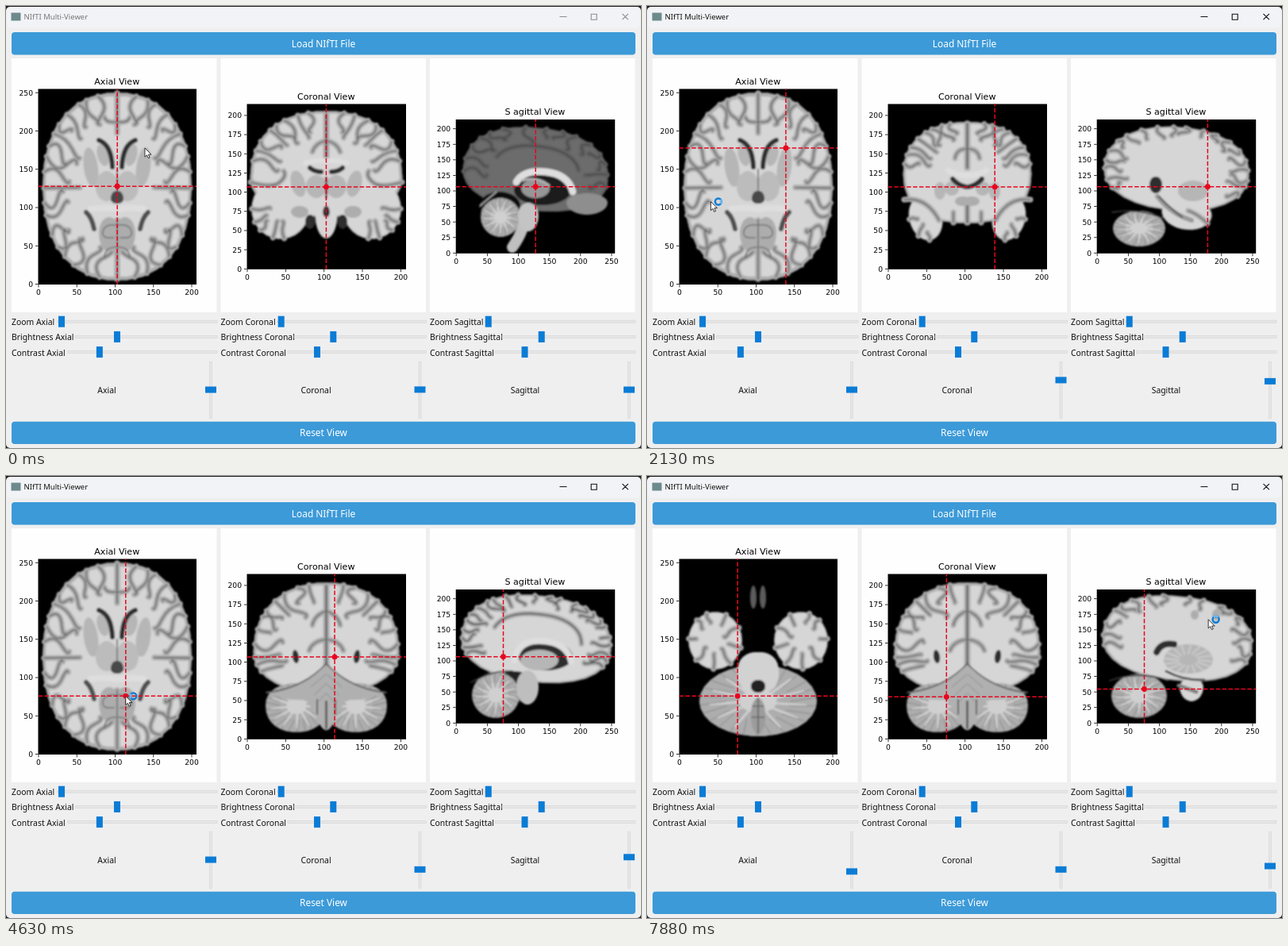
An HTML page for the animation above (8000 ms loop, 800 by 557 pixels).

```html
<!DOCTYPE html>
<html lang="en">
<head>
<meta charset="utf-8">
<title>NIfTI Multi-Viewer</title>
<style>
  html, body { margin: 0; width: 100%; height: 100%; overflow: hidden; background: #202020; }
  svg { display: block; width: 800px; height: 557px; }
  text { font: 10.4px "Noto Sans", "Open Sans", sans-serif; fill: #111; }
  .button { font-size: 11.9px; fill: #fff; text-anchor: middle; }
  .caption { font-size: 9.5px; }
  .plot { font: 11.1px "DejaVu Sans", sans-serif; text-anchor: middle; fill: #000; }
  .tick { font-size: 9.2px; }
  .plot.end { text-anchor: end; }
  .mid { text-anchor: middle; }
</style>
</head>
<body>
<svg id="stage" viewBox="0 0 800 557" xmlns="http://www.w3.org/2000/svg"></svg>
<script>
const LOOP = 8000, TICK = 125;
const RED = '#e8061e', BLUE = '#0a7cd6', BAR = '#3c9ad8';
const GREY = '#adadad', NUCLEUS = '#b6b6b6', FLUID = '#2e2e2e', BRIGHT = '#dedede';

const range = n => Array.from({ length: n }, (_, i) => i);
const random = seed => () => (seed = seed * 16807 % 2147483647) / 2147483647;
const rect = (x, y, w, h, fill, more = '') =>
  `<rect x="${x}" y="${y}" width="${w}" height="${h}" fill="${fill}" ${more}/>`;
const label = (x, y, text, cls = '') => `<text x="${x}" y="${y}" class="${cls}">${text}</text>`;
const groove = (x, y, w, h) => rect(x, y, w, h, '#e6e6e6', 'stroke="#d8d8d8" stroke-width=".7"');
const fill = (color, d) => `<path fill="${color}" d="${d}"/>`;
const line = (color, width, d) =>
  `<path fill="none" stroke="${color}" stroke-width="${width}" stroke-linecap="round" d="${d}"/>`;

// A superellipse as a function of angle (degrees, clockwise from the right) and relative radius.
const lobe = (x, y, rx, up, down, { n = 2, tilt = 0 } = {}) => {
  const bend = v => Math.sign(v) * Math.abs(v) ** (2 / n);
  const rad = Math.PI / 180, ct = Math.cos(tilt * rad), st = Math.sin(tilt * rad);
  return (deg, k = 1) => {
    const s = Math.sin(deg * rad);
    const dx = k * rx * bend(Math.cos(deg * rad)), dy = k * (s < 0 ? up : down) * bend(s);
    return [x + dx * ct - dy * st, y + dx * st + dy * ct].map(v => +v.toFixed(1));
  };
};
const arc = (at, from, to, k = 1) =>
  'M' + range(31).map(i => at(from + (to - from) * i / 30, k)).join('L');
const outline = (at, k) => arc(at, 0, 360, k) + 'Z';
const blob = (color, ...shape) => fill(color, outline(lobe(...shape)));

// Wavy furrows running inwards from the rim.
function furrows(at, from, to, count, depth, seed) {
  const rnd = random(seed * 7919), step = (to - from) / count;
  return range(count).map(i => {
    const a = from + step * (i + .25 + .5 * rnd());
    const reach = depth * (.5 + .8 * rnd()), sway = (rnd() - .5) * 22;
    return `M${at(a, .98)}Q${at(a + sway, 1 - reach * .4)} ${at(a, 1 - reach * .7)}T${at(a - sway * .6, 1 - reach)}`;
  }).join('');
}

const spokes = (at, count, inner, outer) =>
  range(count).map(i => `M${at(i * 360 / count, inner)}L${at(i * 360 / count + 6, outer)}`).join('');
function cerebellum(...shape) {
  const at = lobe(...shape);
  return fill(GREY, outline(at)) + line('#d4d4d4', 2.4, spokes(at, 13, .15, .82)) +
    line('#808080', .9, spokes(at, 26, .55, .97)) + fill('#d0d0d0', outline(at, .32));
}

function slice({ axis, lobes, folds, details, white = '#d6d6d6', grey = GREY, dark = '#6a6a6a' }) {
  const both = art => axis ? `${art}<g transform="translate(${2 * axis}) scale(-1 1)">${art}</g>` : art;
  const d = folds.join('');
  const layers = [
    fill(grey, lobes.map(at => outline(at)).join('')),
    fill(white, lobes.map(at => outline(at, .96)).join('')),
    line(grey, 7, d), line(dark, 1.7, d), ...details
  ];
  return `<g display="none" filter="url(#soft)">${layers.map(both).join('')}</g>`;
}

function axialMiddle() {
  const brain = lobe(140, 228, 94, 119, 118, { n: 2.25 });
  return slice({
    axis: 140, lobes: [brain],
    folds: [furrows(brain, 98, 168, 7, .26, 3), furrows(brain, 168, 216, 6, .42, 8),
      furrows(brain, 216, 264, 5, .26, 5), 'M140 110V160M140 270V344M140 146Q126 148 124 140'],
    details: [
      blob(NUCLEUS, 107, 204, 9, 26, 24, { tilt: -8 }),
      blob(NUCLEUS, 122, 188, 7, 14, 14, { tilt: -15 }),
      blob('#bcbcbc', 127, 228, 14, 20, 18),
      line(FLUID, 6, 'M117 169Q133 175 134 203'),
      line('#777', 1.5, 'M140 206V232'),
      blob('#4a4a4a', 140, 243, 8, 10, 6),
      blob(GREY, 130, 286, 13, 20, 24),
      line('#707070', 1.5, 'M140 276Q124 274 122 284T136 292M138 304Q124 304 124 318'),
      line('#777', 1.6, 'M140 270V344'),
      line(BRIGHT, 8, 'M140 256Q122 253 106 256'),
      line('#505050', 6, 'M101 260Q108 266 111 281')
    ]
  });
}

function axialLow() {
  const pole = lobe(86, 207, 34, 36, 37);
  return slice({
    axis: 140, lobes: [pole], folds: [furrows(pole, 0, 360, 9, .5, 4)],
    details: [
      blob('#5c5c5c', 134, 154, 4, 16, 13),
      cerebellum(140, 284, 74, 46, 44),
      blob('#d2d2d2', 140, 248, 26, 26, 26, { n: 2.4 }),
      blob('#222', 140, 265, 9, 8, 8),
      blob('#9c9c9c', 140, 302, 9, 22, 23),
      line('#666', 1.4, 'M140 280V324M140 290H133M140 304H132')
    ]
  });
}

function coronalCenter() {
  const brain = lobe(403.5, 216, 96, 84, 50, { n: 2.25 }), temporal = lobe(346, 256, 37, 40, 38);
  return slice({
    axis: 403.5, lobes: [brain, temporal, lobe(403.5, 262, 14, 30, 31)],
    folds: [furrows(brain, 188, 264, 8, .3, 6), furrows(temporal, 70, 190, 5, .5, 9),
      'M403 136V190M308 222Q336 230 345 222T350 208M403 170Q390 172 386 184'],
    details: [
      blob(NUCLEUS, 368, 224, 9, 17, 17, { tilt: -15 }), blob(NUCLEUS, 391, 227, 13, 14, 15),
      line(BRIGHT, 6, 'M404 195Q388 194 377 198'),
      line(FLUID, 6, 'M397 209Q389 209 383 204'), line('#666', 2, 'M403 216V242'),
      blob(GREY, 370, 259, 11, 7, 8), blob(FLUID, 383, 272, 6, 9, 9), blob(FLUID, 403.5, 260, 4, 8, 6)
    ]
  });
}

function coronalFront() {
  const brain = lobe(403.5, 212, 81, 66, 62, { n: 2.3 }), temporal = lobe(351, 266, 21, 28, 30, { tilt: -14 });
  return slice({
    axis: 403.5, lobes: [brain, temporal],
    folds: [furrows(brain, 186, 264, 8, .32, 2), furrows(temporal, 80, 200, 3, .5, 5),
      'M403 148V204M324 244Q352 240 368 270M403 250V273M386 273V260M403 180Q390 180 388 192'],
    details: [
      line(BRIGHT, 7, 'M404 214Q388 213 379 207'),
      blob(NUCLEUS, 384, 230, 9, 9, 9), blob(NUCLEUS, 369, 233, 7, 11, 11),
      line(FLUID, 6, 'M402 228Q392 226 385 218'), blob(GREY, 398, 246, 10, 6, 6)
    ]
  });
}

function coronalStem() {
  const brain = lobe(403.5, 216, 95, 84, 50, { n: 2.2 }), temporal = lobe(344, 246, 36, 34, 35);
  return slice({
    axis: 403.5, lobes: [brain, temporal],
    folds: [furrows(brain, 188, 264, 8, .32, 7), furrows(temporal, 70, 190, 5, .5, 3),
      'M403 134V196M308 222Q326 220 340 210T352 216'],
    details: [
      line(BRIGHT, 7, 'M404 202Q388 202 377 198'), line(FLUID, 8, 'M389 213L380 208'),
      blob('#555', 403.5, 226, 14, 8, 8), blob(NUCLEUS, 387, 231, 11, 11, 11),
      blob('#2a2a2a', 377, 262, 9, 14, 12, { tilt: 25 }), cerebellum(385, 278, 14, 16, 16),
      blob('#d0d0d0', 403.5, 272, 17, 34, 42), line('#666', 2, 'M403 238V248M403 262V270')
    ]
  });
}

function coronalBack() {
  const brain = lobe(403.5, 222, 92, 88, 52, { n: 2.2 });
  return slice({
    axis: 403.5, lobes: [brain],
    folds: [furrows(brain, 150, 264, 11, .34, 4), 'M403 138V238M403 170Q388 176 386 188M403 206Q386 208 382 220'],
    details: [
      cerebellum(366, 289, 39, 28, 34, { n: 2.2 }),
      fill('#b0b0b0', 'M404 238Q374 268 328 272Q350 284 378 282L390 302Q398 322 404 320Z'),
      line('#8a8a8a', 1, 'M403 250L384 266M403 262L388 276M403 274L394 284'),
      line('#5a5a5a', 1.8, 'M328 273Q374 268 404 236M403 284V318M392 300V282'),
      blob(FLUID, 365, 228, 4, 9, 8, { tilt: -8 })
    ]
  });
}

function sagittalMidline() {
  const brain = lobe(667, 212, 92, 59, 46, { n: 2.3, tilt: 6 });
  return slice({
    white: '#6c6c6c', grey: '#626262', dark: '#484848', lobes: [brain],
    folds: [furrows(brain, 170, 375, 15, .26, 3), arc(brain, 205, 345, .6)],
    details: [
      blob('#8e8e8e', 732, 248, 26, 12, 15),
      blob('#1c1c1c', 676, 232, 36, 24, 19), blob('#969696', 667, 230, 18, 12, 12),
      line(BRIGHT, 9, 'M643 222Q652 206 680 209T714 234'), line('#b0b0b0', 3, 'M650 220Q668 214 684 226'),
      blob('#111', 622, 252, 26, 18, 18), line('#c8c8c8', 1.3, 'M597 252L618 234'),
      cerebellum(623, 266, 25, 24, 25),
      line('#c0c0c0', 14, 'M656 256Q654 282 638 304'), blob('#c4c4c4', 658, 264, 13, 16, 20)
    ]
  });
}

function sagittalRight() {
  const brain = lobe(667, 208, 92, 56, 50, { n: 2.2, tilt: 4 });
  return slice({
    lobes: [brain, lobe(680, 261, 32, 20, 21, { tilt: 8 })],
    folds: [furrows(brain, 145, 395, 20, .24, 5), 'M706 274Q694 262 682 258'],
    details: [
      blob(NUCLEUS, 688, 233, 19, 13, 13), line('#9a9a9a', 6, 'M643 240Q660 262 686 270'),
      line('#505050', 2, 'M645 240Q658 254 674 266'), blob(FLUID, 641, 225, 8, 10, 11),
      cerebellum(620, 280, 33, 22, 23), line('#333', 1.8, 'M586 260Q620 254 652 268')
    ]
  });
}

function sagittalLeft() {
  const brain = lobe(668, 214, 80, 52, 44, { tilt: 8 }), temporal = lobe(676, 262, 36, 22, 24, { tilt: 15 });
  return slice({
    lobes: [brain, temporal],
    folds: [furrows(brain, 150, 385, 17, .38, 7), furrows(temporal, 20, 170, 5, .4, 2),
      'M716 250Q694 244 676 236T644 224'],
    details: [
      blob('#8c8c8c', 686, 239, 22, 10, 10, { tilt: 15 }), line('#4a4a4a', 2, 'M664 234Q682 244 704 250M674 230L694 240'),
      cerebellum(620, 279, 22, 18, 19), line('#333', 1.8, 'M597 262Q620 256 642 270')
    ]
  });
}

function sagittalNearMidline() {
  const brain = lobe(668, 210, 95, 60, 50, { n: 2.3, tilt: 6 });
  return slice({
    lobes: [brain], dark: '#555',
    folds: [furrows(brain, 150, 390, 24, .22, 9), arc(brain, 200, 355, .6)],
    details: [
      blob(FLUID, 680, 228, 34, 20, 17), blob(NUCLEUS, 672, 232, 24, 13, 13),
      line(BRIGHT, 8, 'M641 232Q645 206 676 208T712 234'),
      blob('#222', 640, 260, 26, 14, 26), cerebellum(617, 276, 30, 29, 29),
      blob('#bebebe', 657, 266, 14, 21, 22), line('#333', 1.8, 'M586 260Q612 244 638 246')
    ]
  });
}

function sagittalWhite() {
  const brain = lobe(668, 208, 95, 57, 50, { n: 2.3, tilt: 6 }), nucleus = lobe(682, 232, 31, 20, 17);
  return slice({
    lobes: [brain, lobe(686, 266, 15, 12, 18)],
    folds: [furrows(brain, 160, 385, 17, .2, 6)],
    details: [
      fill(NUCLEUS, outline(nucleus)), line('#cdcdcd', 1.8, spokes(nucleus, 16, .4, .95)),
      blob(GREY, 717, 175, 5, 7, 7), blob(GREY, 690, 175, 5, 6, 6),
      line(FLUID, 8, 'M642 222Q648 209 664 212'), line('#484848', 3, 'M654 246Q676 258 702 257'),
      line('#808080', 5, 'M670 264L692 272'),
      cerebellum(620, 277, 35, 28, 28), line('#333', 1.8, 'M583 258Q620 244 656 258')
    ]
  });
}

// Volume size in voxels; each view shows two of its axes and steps along the third.
const SIZE = [207, 256, 215];
const views = [
  { name: 'Axial', title: 'Axial View', panel: 7, x: 40.5, y: 104.5, w: 199.5, h: 246.5,
    across: 0, up: 1, depth: 2, scale: .965, yStep: 50, grooves: [65, 87, 78],
    slices: { 107: axialMiddle, 55: axialLow } },
  { name: 'Coronal', title: 'Coronal View', panel: 270.5, x: 303.5, y: 123.5, w: 200.5, h: 208.3,
    across: 0, up: 2, depth: 1, scale: .967, yStep: 25, grooves: [342, 363, 355],
    slices: { 128: coronalCenter, 178: coronalFront, 108: coronalStem, 76: coronalBack } },
  { name: 'Sagittal', title: 'S agittal View', panel: 534, x: 566.7, y: 143, w: 200.5, h: 168.8,
    across: 1, up: 2, depth: 0, scale: .783, yStep: 25, grooves: [603, 625, 616],
    slices: { 103: sagittalMidline, 139: sagittalRight, 41: sagittalLeft, 114: sagittalNearMidline, 76: sagittalWhite } }
];
const project = ({ x, y, h, scale, across, up }, voxel) =>
  [x + .3 + voxel[across] * scale, y + h - .3 - voxel[up] * scale];

function drawTicks({ x, y, h, scale, across, up, yStep }) {
  const bottom = y + h;
  const xs = range(Math.ceil(SIZE[across] / 50)).map(i => {
    const px = x + .5 + i * 50 * scale;
    return rect(px - .4, bottom, .8, 3.4, '#000') + label(px, bottom + 13.3, i * 50, 'plot tick');
  });
  const ys = range(Math.ceil(SIZE[up] / yStep)).map(i => {
    const py = bottom - .5 - i * yStep * scale;
    return rect(x - 3.5, py - .4, 3.5, .8, '#000') + label(x - 6.5, py + 3.4, i * yStep, 'plot tick end');
  });
  return [...xs, ...ys].join('');
}

function drawView(view) {
  const { name, title, panel, x, y, w, h, slices, grooves } = view;
  const right = panel + 259, settings = { Zoom: .025, Brightness: .296, Contrast: .212 };
  const rows = Object.entries(settings).map(([word, value], i) => {
    const cy = 397.7 + i * 19.2, start = grooves[i];
    return label(panel, cy + 4.5, `${word} ${name}`) + groove(start, cy - 1.5, right - start, 3) +
      rect(start + (right - start) * value - 4, cy - 7, 8, 14, BLUE);
  }).join('');
  return rect(panel, 66, 258.5, 320, '#fefefe') + rect(x, y, w, h, '#000') +
    Object.entries(slices).map(([at, draw]) => `<g class="slice" data-at="${at}">${draw().replace('display="none"', '')}</g>`).join('') +
    `<path class="cross" fill="none" stroke="${RED}" stroke-width="1.5" stroke-dasharray="5.5 2.4"/>` +
    `<circle class="dot" r="3.4" fill="${RED}"/>` +
    label(x + w / 2 - .5, y - 5.8, title, 'plot') + drawTicks(view) + rows +
    label(panel + 120, 487.5, name, 'mid') + groove(right - 9.5, 448.5, 3, 71) +
    rect(right - 15, 0, 14, 8, BLUE, 'class="handle"');
}

const stage = document.getElementById('stage');
stage.innerHTML = `
  <defs><filter id="soft" x="-5%" y="-5%" width="110%" height="110%"><feGaussianBlur stdDeviation="1.1"/></filter></defs>
  ${rect(0, 0, 800, 557, '#202020')}${rect(0, 1, 800, 556, '#efeff0', 'rx="5"')}
  ${rect(1, 1.5, 798, 26, '#f2f3f6', 'rx="5"')}
  ${rect(6.5, 8.5, 12, 10, '#6d8a8c')}
  <g id="caption">${label(22.5, 17, 'NIfTI Multi-Viewer', 'caption')}</g>
  <path id="controls" fill="none" stroke-width="1.1" d="M697.5 13.5h9M737.2 10.2h7v7h-7zM776.5 9.8l7.4 7.4m0-7.4l-7.4 7.4"/>
  ${rect(7, 33, 786, 28.5, BAR, 'rx="4"')}${label(400, 52, 'Load NIfTI File', 'button')}
  ${rect(7, 523.7, 786, 28.3, BAR, 'rx="4"')}${label(400, 542, 'Reset View', 'button')}
  ${views.map(view => `<g class="view">${drawView(view)}</g>`).join('')}
  <g id="pointer">
    <path d="M0 0v11.2l2.6-2.3 1.7 3.9 1.9-.8-1.7-3.8h3.6z" fill="#fff" stroke="#222" stroke-width=".9"/>
    <g id="busy" fill="none"><circle cx="9.5" r="4" stroke="${BLUE}" stroke-width="2.4"/>
      <path id="gleam" d="M9.5 -4a4 4 0 0 1 4 4" stroke="#8fd2ff" stroke-width="1.4"/></g>
  </g>`;

const [caption, controls, pointer, busy, gleam] =
  ['caption', 'controls', 'pointer', 'busy', 'gleam'].map(id => document.getElementById(id));
const panes = [...stage.querySelectorAll('.view')].map(node => ({
  slices: [...node.querySelectorAll('.slice')],
  cross: node.querySelector('.cross'), dot: node.querySelector('.dot'), handle: node.querySelector('.handle')
}));

// Each click: pointer travels, presses in one view, and the chosen voxel shows later.
const clicks = [
  { move: [-1, 0], press: 1125, show: 1250, view: 0, voxel: [139, 178, 107] },
  { move: [1625, 2000], press: 2000, show: 2750, view: 0, voxel: [41, 108, 107] },
  { move: [3500, 4000], press: 4000, show: 4250, view: 0, voxel: [114, 76, 107] },
  { move: [5000, 5750], press: 6125, show: 6250, view: 1, voxel: [76, 76, 55] },
  { move: [6750, 7625], press: 7750, show: LOOP, view: 2, voxel: [76, 179, 167] }
].map(click => ({ ...click, point: project(views[click.view], click.voxel) }));
const HOME = [103, 128, 107];

const pointerAt = t => clicks.reduce((at, { move: [start, end], point }) => {
  const u = Math.min(1, Math.max(0, (t - start) / (end - start))), e = u * u * (3 - 2 * u);
  return at.map((v, k) => v + (point[k] - v) * e);
}, clicks[0].point);

function render(time) {
  const t = Math.floor(time % LOOP / TICK) * TICK;
  const voxel = clicks.findLast(click => click.show <= t)?.voxel ?? HOME;
  panes.forEach((pane, i) => {
    const view = views[i], { x, y, w, h, depth } = view, [cx, cy] = project(view, voxel);
    pane.slices.forEach(node => node.setAttribute('display', +node.dataset.at === voxel[depth] ? 'inline' : 'none'));
    pane.cross.setAttribute('d', `M${x} ${cy}h${w}M${cx} ${y + h}v${-h}`);
    pane.dot.setAttribute('cx', cx);
    pane.dot.setAttribute('cy', cy);
    pane.handle.setAttribute('y', 479.4 - 61.3 * (voxel[depth] / SIZE[depth] - .5));
  });
  const active = t >= 500;
  caption.setAttribute('opacity', active ? 1 : .55);
  controls.setAttribute('stroke', active ? '#111' : '#8c8c8c');
  pointer.setAttribute('transform', `translate(${pointerAt(t)})`);
  busy.setAttribute('display', clicks.some(c => t >= c.press && t < c.show + 500) ? 'inline' : 'none');
  gleam.setAttribute('transform', `rotate(${t * .36} 9.5 0)`);
}

const began = performance.now();
(function frame() {
  render(performance.now() - began);
  requestAnimationFrame(frame);
})();
</script>
</body>
</html>
```
